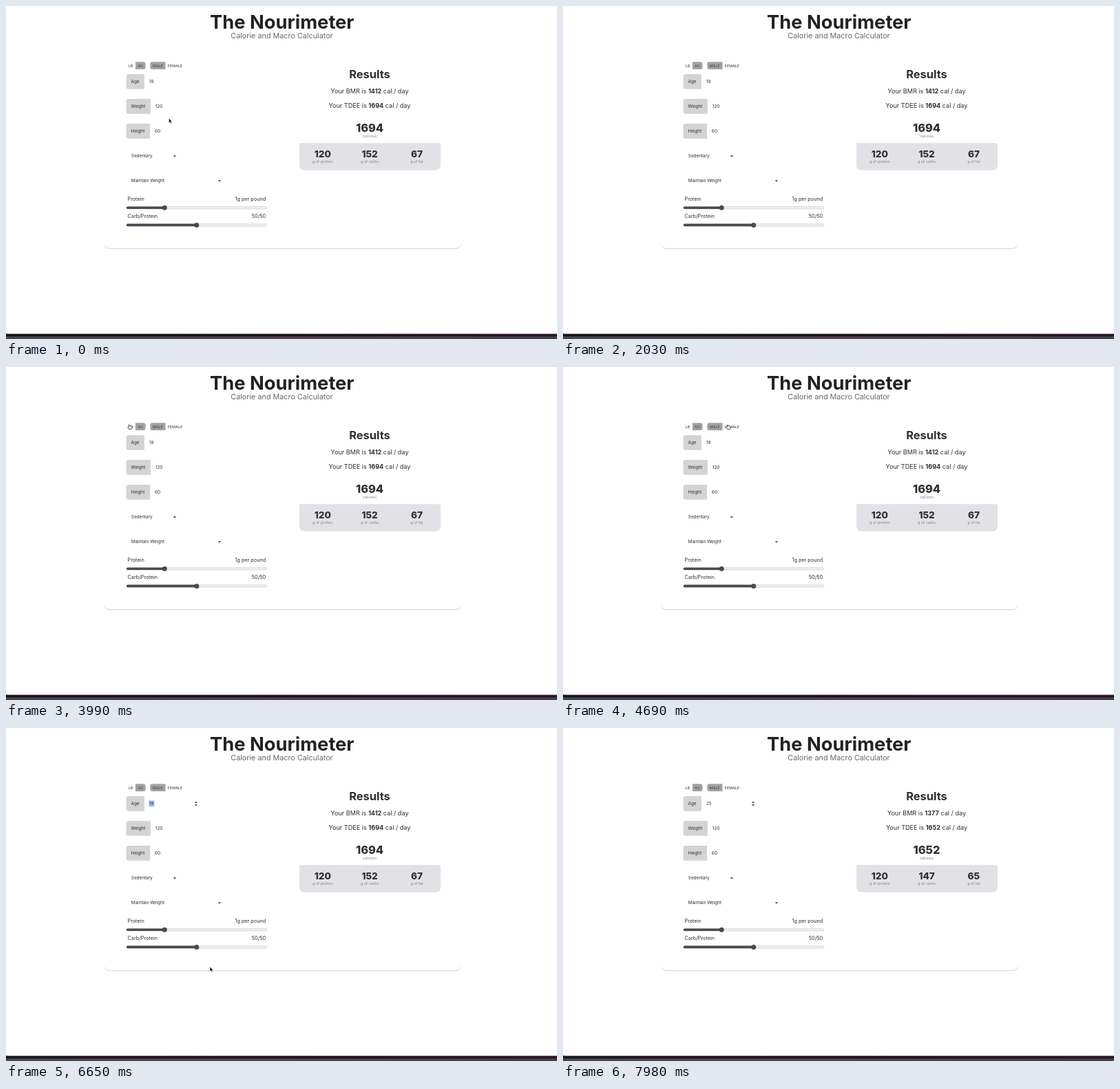
Write an HTML page that moves like this. It is 800x484 px and loops after 8000 ms.

```html
<!DOCTYPE html>
<html lang="en">
<head>
<meta charset="utf-8">
<title>Macro calculator</title>
<style>
  html, body { margin: 0; width: 100%; height: 100%; overflow: hidden; background: #fff; }
  svg { display: block; width: 100vw; height: 100vh; }
  text { font-family: Inter, Roboto, sans-serif; font-optical-sizing: none; fill: #2f2f34; white-space: pre; }
  .bold { font-weight: 700; }
  .heavy { font-weight: 800; }
  .note { fill: #85858a; }
</style>
</head>
<body>
<svg id="stage" viewBox="0 0 800 484" xmlns="http://www.w3.org/2000/svg">
  <defs>
    <linearGradient id="edge">
      <stop offset="0" stop-color="#17131d"/><stop offset=".5" stop-color="#1c101d"/><stop offset="1" stop-color="#281528"/>
    </linearGradient>
    <linearGradient id="desk">
      <stop offset="0" stop-color="#48444f"/><stop offset=".5" stop-color="#51404f"/><stop offset="1" stop-color="#463c4b"/>
    </linearGradient>
    <linearGradient id="rim" x1="0" y1="344" x2="0" y2="353" gradientUnits="userSpaceOnUse">
      <stop offset="0" stop-color="#fff"/><stop offset="1" stop-color="#d9d9db"/>
    </linearGradient>
  </defs>
  <rect width="800" height="484" fill="#fff"/>
  <path d="M142 344.4Q143 352.7 151 352.7H652Q660 352.7 661 344.4" fill="none" stroke="url(#rim)" stroke-width="1.2"/>
  <path d="M426 199.3H628Q631 199.3 631 202V231Q631 238.8 623 238.8H434Q426 238.8 426 231Z" fill="#e2e1e6"/>
  <g id="form"></g>
  <rect id="picked" x="207.4" y="105.2" width="8.2" height="9.4" fill="#a6c9f2"/>
  <g id="labels"></g>
  <path id="caret" d="M216.4 106V114" stroke="#333" stroke-width=".7"/>
  <path id="spin" d="M274 108.9L276 106.6 278 108.9ZM274 111.1L276 113.4 278 111.1Z" fill="#4a4a4e"/>
  <circle id="ring" r="10.7" fill="none" stroke="#a3bfe8" stroke-width="1.6"/>
  <g id="pointer">
    <path id="arrow" d="M0 0V7L1.6 5.6 2.7 8 3.9 7.5 2.8 5.2H4.8Z" fill="#111" stroke="#fff" stroke-width=".5"/>
    <path id="hand" d="M-1.6 3.6L-3 .9Q-3.1-.2-1.9.2V-2.6Q-1.3-3.6-.7-2.6V-1.5Q0-2.2.6-1.5 1.3-1.9 1.8-1.1 2.7-1.3 3 -.4V1.6L2 3.6Z" fill="#fff" stroke="#222" stroke-width=".8" stroke-linejoin="round"/>
    <path id="beam" d="M-1.6-3.6Q0-3.6 0-2.6 0-3.6 1.6-3.6M0-2.6V2.6M-1.6 3.6Q0 3.6 0 2.6 0 3.6 1.6 3.6" fill="none" stroke="#222" stroke-width=".8"/>
  </g>
  <path d="M0 475.6Q.4 476.6 2 476.6H800V481H0Z" fill="url(#edge)"/>
  <rect y="480.2" width="800" height="3.8" fill="url(#desk)"/>
</svg>
<script>
const LOOP = 8000, STEP = 70;
const SMALL = 6.36, NOTE = 5.45, LABEL = 7.27;
const $ = id => document.getElementById(id);

function add(parent, tag, attrs) {
  const node = document.createElementNS("http://www.w3.org/2000/svg", tag);
  for (const key in attrs) node.setAttribute(key, attrs[key]);
  return $(parent).appendChild(node);
}

function text(str, x, y, size, anchor = "start", cls = "", fill = "") {
  const node = add("labels", "text", { x, y, "font-size": size, "text-anchor": anchor, class: cls });
  if (fill) node.style.fill = fill;
  node.textContent = str;
  return node;
}

const leftPill = (x, y, w, h, r, fill) => add("form", "path", {
  d: `M${x + w} ${y}H${x + r}q${-r} 0 ${-r} ${r}v${h - 2 * r}q0 ${r} ${r} ${r}H${x + w}Z`, fill });
const rightPill = (x, y, w, h, r, fill) => add("form", "path", {
  d: `M${x} ${y}h${w - r}q${r} 0 ${r} ${r}v${h - 2 * r}q0 ${r} ${-r} ${r}H${x}Z`, fill });

function slider(y, thumb, name, value) {
  add("form", "rect", { x: 175.3, y: y - 1.5, width: 203.4, height: 3, rx: 1.5, fill: "#f3f3f4", stroke: "#cbcbce", "stroke-width": .8 });
  add("form", "rect", { x: 174.8, y: y - 1.8, width: thumb - 174.8, height: 3.6, rx: 1.8, fill: "#4b4a53" });
  add("form", "circle", { cx: thumb, cy: y, r: 3.5, fill: "#4b4a53" });
  text(name, 176.5, y - 10, LABEL);
  text(value, 377.2, y - 10, LABEL, "end");
}

function select(str, y, arrowX) {
  text(str, 181.8, y + 2.3, SMALL);
  add("form", "path", { d: `M${arrowX - 2.2} ${y - .8}h4.4l-2.2 2.3Z`, fill: "#3a3a40" });
}

// Header and unit toggles
text("The Nourimeter", 400.8, 32.8, 27.3, "middle", "bold", "#222226");
text("Calorie and Macro Calculator", 400.5, 47.4, 10.8, "middle", "", "#68686c");
rightPill(188, 81.3, 14.5, 10.6, 3, "#a2a2a4");
leftPill(209.3, 81.3, 22.2, 10.6, 3, "#a2a2a4");
text("LB", 181, 88.5, NOTE, "middle");
text("KG", 195.2, 88.5, NOTE, "middle", "", "#4c4c50");
text("MALE", 220.3, 88.5, NOTE, "middle", "", "#3e3e42");
text("FEMALE", 245.5, 88.5, NOTE, "middle");

// Inputs
const field = (name, value, y, w) => {
  leftPill(174.6, y - 11, w, 21.8, 3.6, "#d4d4d5");
  text(name, 181.5, y + 2.3, SMALL);
  return text(value, 174.6 + w + 7, y + 2.3, SMALL);
};
const ageText = field("Age", "18", 110, 26.3);
field("Weight", "120", 146, 35.3);
field("Height", "60", 182, 34.5);
select("Sedentary", 218, 245);
select("Maintain Weight", 254, 310);
slider(293.3, 230.3, "Protein", "1g per pound");
slider(318.4, 276.8, "Carb/Protein", "50/50");

// Results
text("Results", 528, 105.4, 16.4, "middle", "bold");
function resultLine(name, y) {
  const line = text(`Your ${name} is `, 528, y, 9.1, "middle");
  const value = document.createElementNS(line.namespaceURI, "tspan");
  value.setAttribute("class", "bold");
  line.append(value, " cal / day");
  return value;
}
const bmrText = resultLine("BMR", 126.8);
const tdeeText = resultLine("TDEE", 148.4);
const calText = text("", 528, 182.6, 16.4, "middle", "heavy");
text("calories", 528, 190.6, NOTE, "middle", "note");
const macros = ["protein", "carbs", "fat"].map((name, i) => {
  const x = 459.8 + i * 68.3;
  text("g of " + name, x, 228.3, NOTE, "middle", "note");
  return text("", x, 220, 13.64, "middle", "heavy");
});

function showResults(age) {
  const bmr = 1502 - 5 * age, tdee = bmr * 1.2, protein = 120;
  const rest = (tdee - protein * 4) / 2;
  ageText.textContent = age;
  bmrText.textContent = bmr;
  tdeeText.textContent = calText.textContent = Math.round(tdee);
  [protein, rest / 4, rest / 9].forEach((g, i) => macros[i].textContent = Math.round(g));
}

// Pointer stops: time, x, y
const path = [
  [0, 236.4, 163], [140, 236.4, 163], [700, 262, 492], [2380, 190, 492], [2870, 100, 94], [3080, 100, 94],
  [3570, 180, 87], [4200, 180, 87], [4480, 220, 87], [4760, 244, 87], [4970, 244, 87],
  [5180, 216.6, 107], [5740, 216.6, 107], [6160, 262, 260], [6440, 292, 338], [6650, 296, 347],
  [6720, 323, 465], [6790, 345, 474], [6860, 369, 479], [6930, 380, 495], [LOOP, 380, 495]
];

function pointerAt(t) {
  const i = Math.max(1, path.findIndex(p => p[0] >= t));
  const [t0, x0, y0] = path[i - 1], [t1, x1, y1] = path[i];
  const u = (t - t0) / (t1 - t0), e = u * u * (3 - 2 * u);
  return [x0 + (x1 - x0) * e, y0 + (y1 - y0) * e];
}

const show = (id, on) => $(id).setAttribute("visibility", on ? "visible" : "hidden");
const within = (v, a, b) => v >= a && v < b;

function draw(ms) {
  const t = Math.floor(ms % LOOP / STEP) * STEP;
  const [x, y] = pointerAt(t);
  const onToggle = within(x, 174, 258) && within(y, 81, 93);
  const onField = within(x, 202, 280) && [110, 146, 182].some(c => Math.abs(y - c) < 11);
  $("pointer").setAttribute("transform", `translate(${x} ${y})`);
  show("hand", onToggle);
  show("beam", onField);
  show("arrow", !onToggle && !onField);

  $("ring").setAttribute("cx", x);
  $("ring").setAttribute("cy", y);
  show("ring", within(t, 5250, 5530));
  show("picked", within(t, 5460, 7070));
  show("spin", t >= 5180);
  show("caret", within(t, 5250, 5460) || within(t, 7070, 7780));
  $("caret").setAttribute("transform", `translate(${within(t, 7070, 7280) ? -4 : 0} 0)`);
  showResults(t < 7070 ? 18 : t < 7280 ? 2 : 25);
}

const start = performance.now();
function tick() {
  draw(performance.now() - start);
  requestAnimationFrame(tick);
}
draw(0);
requestAnimationFrame(tick);
</script>
</body>
</html>
```
